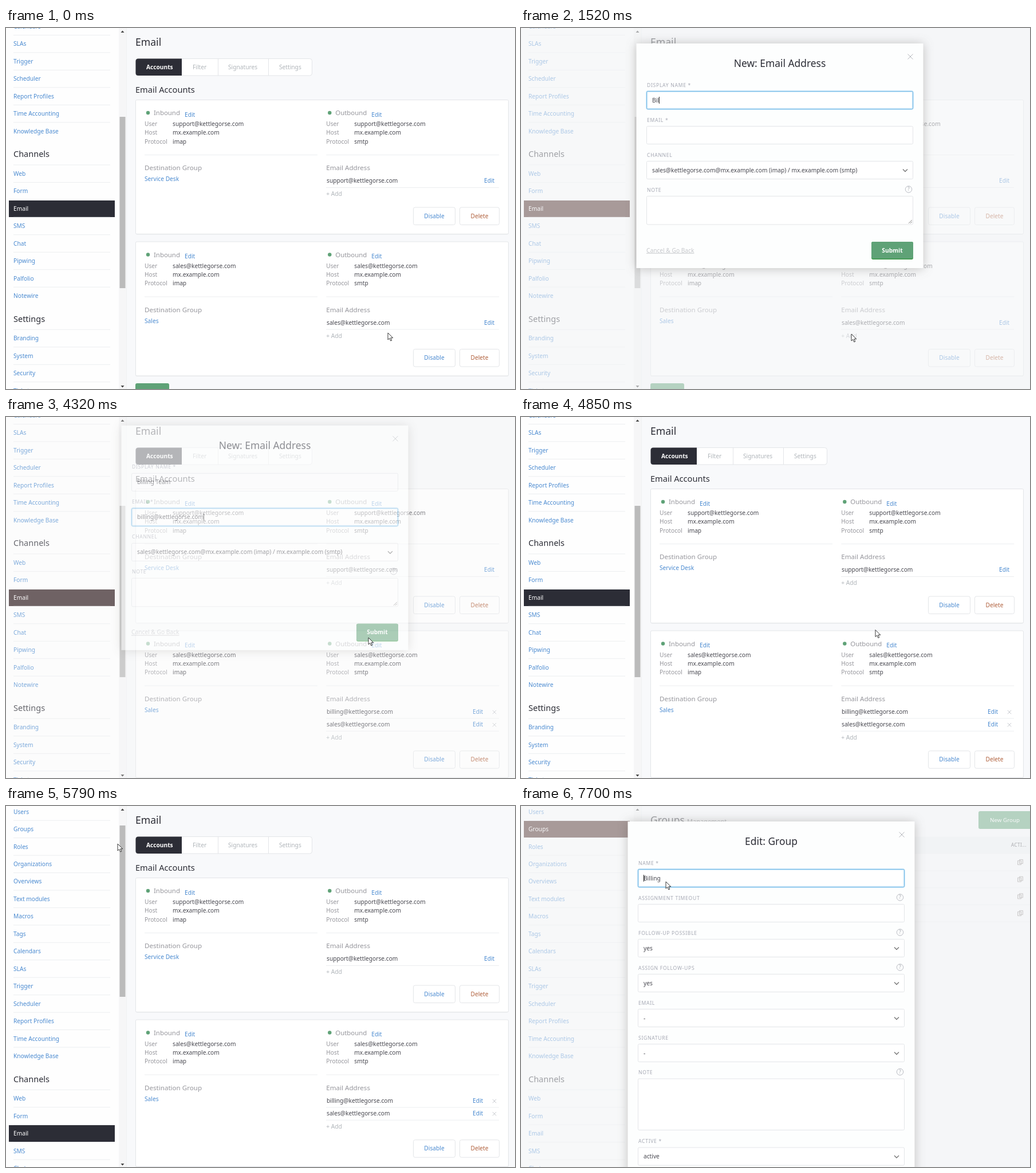
An HTML page for the animation above (8 s loop, 889x630 px).

```html
<!DOCTYPE html>
<html lang="en">
<head>
<meta charset="utf-8">
<title>Email channel setup</title>
<style>
html, body { margin: 0; width: 100%; height: 100%; overflow: hidden; background: #f8f9fb; }
svg { display: block; font-family: "Noto Sans", "Open Sans", sans-serif; }
.modal { filter: drop-shadow(0 1px 9px rgba(70, 65, 60, .3)); }
</style>
</head>
<body>
<svg id="stage" width="889" height="630" viewBox="0 0 889 630"></svg>
<script>
const INK = '#2c2d36', TEXT = '#484850', GRAY = '#96969c', PALE = '#b0b5ba',
      LINK = '#4a8ad0', GREEN = '#5fa277', RULE = '#eceef0', EDGE = '#e3e5e8';
const DOMAIN = 'kettlegorse.com', HOST = 'mx.example.com';
const LOOP = 8000, ROW = 30.45, SCROLL = 256.3, VEIL = .58;

// y is the middle of the capitals
const text = (x, y, s, fill = TEXT, size = 10.2, attrs = '') =>
  `<text x="${x}" y="${y + size * .36}" font-size="${size}" fill="${fill}" ${attrs}>${s}</text>`;
const rect = (x, y, w, h, fill, attrs = '') =>
  `<rect x="${x}" y="${y}" width="${w}" height="${h}" fill="${fill}" ${attrs}/>`;
const box = (x, y, w, h, r = 2) => rect(x, y, w, h, '#fff', `stroke="${EDGE}" rx="${r}"`);
const path = (d, stroke, attrs = '') => `<path d="${d}" fill="none" stroke="${stroke}" ${attrs}/>`;
const rule = (x1, x2, y) => path(`M${x1} ${y}H${x2}`, RULE);
const cross = (x, y, r, color) =>
  path(`M${x - r} ${y - r}l${2 * r} ${2 * r}m0 ${-2 * r}l${-2 * r} ${2 * r}`, color);
const group = (id, body, attrs = '') => `<g id="${id}" ${attrs}>${body}</g>`;
const MEDIUM = 'font-weight="500"', CENTER = 'text-anchor="middle"';

// Sidebar, laid out in its scrolled-up position
const sections = [
  ['', 'Users,Groups,Roles,Organizations,Overviews,Text modules,Macros,Tags,Calendars,SLAs,Trigger,Scheduler,Report Profiles,Time Accounting,Knowledge Base'],
  ['Channels', 'Web,Form,Email,SMS,Chat,Pipwing,Palfolio,Notewire'],
  ['Settings', 'Branding,System,Security,Ticket']
];
const itemY = {};
function sidebar() {
  let y = 10, items = '';
  for (const [title, names] of sections) {
    if (title) {
      items += text(13, y + 9.7, title, INK, 14.5) + rule(13, 182, y + 28.5);
      y += 43.8;
    }
    names.split(',').forEach((name, i, all) => {
      itemY[name] = y;
      items += text(13, y, name, LINK, 10.2, `id="nav${name.replace(' ', '')}"`);
      if (i < all.length - 1) items += rule(13, 182, y + 15.2);
      y += ROW;
    });
  }
  const bar = rect(5, -14.6, 184.5, 29.6, INK) + rect(5, -14.6, 184.5, 29.6, '#401c18', 'id="tint"');
  return rect(0, 0, 197, 630, '#fefefe') +
    group('nav', group('bar', bar, 'shape-rendering="crispEdges"') + items) +
    rect(197, 0, 13.5, 630, '#f6f6f7') + path('M210.5 0V630', '#f0f1f3') +
    '<path d="M200.5 8h6l-3-3.5zM200.5 624h6l-3 3.5z" fill="#444"/>' +
    rect(198.5, 0, 10, 299, '#bbb', 'id="thumb"');
}

function inOut(x, title, user, protocol) {
  const rows = [['User', user], ['Host', HOST], ['Protocol', protocol]];
  return `<circle cx="${x + 6}" cy="148" r="3.2" fill="${GREEN}"/>` +
    text(x + 16, 148, title, GRAY, 11.4) +
    text(x + (title === 'Inbound' ? 70 : 79), 151, 'Edit', LINK) +
    rows.map(([key, value], i) =>
      text(x, 167.5 + 15.2 * i, key, GRAY) + text(x + 49, 167.5 + 15.2 * i, value)).join('') +
    rule(x, x + 302, 221.5);
}

function button(x, y, w, label, color) {
  return box(x, y, w, 30.5, 3) + text(x + w / 2, y + 15, label, color, 10.2, CENTER);
}

function card(dy, user, dest, addresses) {
  const extra = (addresses.length - 1) * 22.2, many = addresses.length > 1;
  const list = addresses.map((a, i) => {
    const y = 266.5 + 22.2 * i;
    return text(560, y, a) + text(many ? 815 : 835, y, 'Edit', LINK) +
      rule(559, 861, y + 12) + (many ? cross(853, y + 1, 3.2, '#c6c9ce') : '');
  }).join('');
  return `<g transform="translate(0 ${dy})">` +
    rect(226.5, 126.5, 651, 234 + extra, '#e9ecee', 'rx="2"') +
    box(226.5, 125.5, 651, 234 + extra) +
    inOut(242, 'Inbound', user, 'imap') + inOut(559.3, 'Outbound', user, 'smtp') +
    text(242, 244, 'Destination Group', GRAY, 11.6) + text(242, 263.5, dest, LINK) +
    text(559.3, 244, 'Email Address', GRAY, 11.6) + list +
    text(559.3, 289.5 + extra, '+ Add', PALE) +
    button(711.5, 313 + extra, 73, 'Disable', LINK) +
    button(792.5, 313 + extra, 69, 'Delete', '#b0603c') + '</g>';
}

function emailPage() {
  const support = 'support@' + DOMAIN, sales = 'sales@' + DOMAIN;
  return text(226, 24.5, 'Email', INK, 17.6) +
    box(226.5, 53.5, 308, 29.5, 4) +
    `<path d="M231 53.5h76v29.5h-76q-4.5 0-4.5-4.5v-20.5q0-4.5 4.5-4.5z" fill="${INK}"/>` +
    path('M370.5 54v29M458.5 54v29', EDGE) +
    text(245, 68.5, 'Accounts', '#fff', 10.2, 'font-weight="600"') +
    text(326, 68.5, 'Filter', PALE) + text(388, 68.5, 'Signatures', PALE) +
    text(477, 68.5, 'Settings', PALE) +
    text(226, 108, 'Email Accounts', INK, 14.6) +
    card(0, support, 'Service Desk', [support]) +
    group('before', card(247.5, sales, 'Sales', [sales]) + rect(226, 620, 59, 30, GREEN, 'rx="3"')) +
    group('after', card(247.5, sales, 'Sales', ['billing@' + DOMAIN, sales]));
}

function groupsPage() {
  const rows = ['2nd Level', 'Billing', 'Sales', 'Service Desk'].map((name, i) => {
    const y = 98 + 29.7 * i;
    return text(233.5, y, name) + rule(226, 889, y + 15) +
      `<g transform="translate(867 ${y - 5})" fill="#eee" stroke="#96908f">
        <path d="M3.5 .5h6v7h-6zM.5 2.5h6v7h-6z"/></g>`;
  }).join('');
  return text(226, 24.5, 'Groups', INK, 17.4) + text(290, 27, 'Management', '#77777d', 11) +
    rect(799, 9, 95, 31, GREEN, 'rx="3"') + text(819, 24.5, 'New Group', '#fff', 9.8, MEDIUM) +
    rect(226, 53.5, 663, 30, '#f0f1f3') +
    text(233, 68.5, 'NAME', TEXT, 8.2, 'letter-spacing=".4"') +
    text(856, 68.5, 'ACTI...', TEXT, 8.2, 'letter-spacing=".4"') + rows;
}

// One labelled form field; kinds: s = select, h = help mark
function field(label, y, { value = '', kind = '', h = 31, id = '' } = {}) {
  return text(1, y - 11, label, '#a6a9b4', 8.6, `letter-spacing=".7" ${MEDIUM}`) +
    box(.5, y, 465, h) +
    text(10, y + 15.5, value, TEXT, 10.2, id && `id="${id}"`) +
    (kind.includes('s') ? path(`M448 ${y + 14}l4 4 4-4`, '#777', 'stroke-width="1.4"') : '') +
    (kind.includes('h') ? `<circle cx="458" cy="${y - 12}" r="5.7" fill="none" stroke="#b8bbc2"/>` +
      text(458, y - 12, '?', '#a0a3aa', 8, CENTER) : '');
}

function modal(id, x, h, title, body) {
  return group(id, `<g class="modal">${rect(-17.5, 27, 501, h, '#fdfefe')}</g>` +
    text(233, 62, title, INK, 17.4, CENTER) + cross(461, 50, 4.5, '#b4b7bc') + body,
    `data-x="${x}"`);
}

const focusRing = id => group(id,
  rect(.5, 110.5, 465, 31, 'none', 'stroke="#a5d8f6" stroke-opacity=".35" stroke-width="4" rx="3"') +
  rect(.5, 110.5, 465, 31, 'none', 'stroke="#62b0e2" rx="2"'));

const addModal = modal('add', 219, 392, 'New: Email Address',
  field('DISPLAY NAME *', 110.5, { id: 'name' }) +
  field('EMAIL *', 171.5, { id: 'mail' }) +
  field('CHANNEL', 232.5, { kind: 's', value: `sales@${DOMAIN}@${HOST} (imap) / ${HOST} (smtp)` }) +
  field('NOTE', 293.5, { kind: 'h', h: 49.5 }) +
  path('M458 341l6-6m-3 6l3-3', '#888') +
  focusRing('ring') + path('M0 120V132', '#222', 'id="caret"') +
  text(0, 388, 'Cancel &amp; Go Back', '#c6c8cc', 10.2, `text-decoration="underline" ${MEDIUM}`) +
  rect(393, 373, 73, 31, '#3c9a48', 'rx="3"') + rect(393, 373, 73, 29.5, GREEN, 'rx="3"') +
  text(429.5, 388, 'Submit', '#fff', 10.2, `${CENTER} font-weight="600"`));

const editModal = modal('edit', 204, 680, 'Edit: Group',
  field('NAME *', 110.5, { value: 'Billing' }) +
  field('ASSIGNMENT TIMEOUT', 171.5, { kind: 'h' }) +
  field('FOLLOW-UP POSSIBLE', 232.5, { kind: 'sh', value: 'yes' }) +
  field('ASSIGN FOLLOW-UPS', 293.5, { kind: 'sh', value: 'yes' }) +
  field('EMAIL', 354.5, { kind: 's', value: '-' }) +
  field('SIGNATURE', 415.5, { kind: 's', value: '-' }) +
  field('NOTE', 476, { kind: 'h', h: 89.5 }) +
  field('ACTIVE *', 596, { kind: 's', value: 'active' }) +
  focusRing('editRing') + path('M10.5 120V132', '#222'));

const $ = id => document.getElementById(id);
$('stage').innerHTML = rect(0, 0, 889, 630, '#f8f9fb') +
  group('emailPage', emailPage()) + group('groupsPage', groupsPage()) + sidebar() +
  rect(0, 0, 889, 630, '#f3f4f6', 'id="veil"') + addModal + editModal +
  group('cursor', '<path d="M0 0V12L2.8 9.5 4.8 14 6.8 13.1 4.8 8.8H8.8Z" fill="#fff" stroke="#222" stroke-width=".9"/>');

// Pointer stops: time, x, y
const stops = [
  [100, 667, 532], [350, 610, 539], [520, 568, 528], [620, 577, 534],
  [3500, 577, 534], [3850, 585, 500], [4050, 633, 385], [4780, 633, 385],
  [4850, 620, 372], [5250, 203, 187], [5350, 203, 187], [5740, 195, 66],
  [5800, 195, 66], [6050, 50, 38], [6330, 50, 38], [6650, 211, 137],
  [7090, 243, 122], [7170, 253, 127], [7280, 253, 127], [7340, 253, 132]
];
const ramp = (t, a, b) => Math.min(1, Math.max(0, (t - a) / (b - a)));
const ease = p => p * (2 - p);

function pointer(t) {
  const i = stops.findIndex(s => s[0] > t);
  if (i < 0) return stops.at(-1).slice(1);
  if (i === 0) return stops[0].slice(1);
  const [t0, x0, y0] = stops[i - 1], [t1, x1, y1] = stops[i], p = ramp(t, t0, t1);
  return [x0 + (x1 - x0) * p, y0 + (y1 - y0) * p];
}

const typed = (t, start, step) => t < start ? 0 : 1 + Math.floor((t - start) / step);
const move = (id, x, y) => $(id).setAttribute('transform', `translate(${x} ${y})`);
const show = (id, on) => $(id).style.display = on ? '' : 'none';

function showModal(id, m) {
  show(id, m > 0);
  $(id).style.opacity = m;
  move(id, $(id).dataset.x, -25 * (1 - m));
}

function draw(t) {
  const onGroups = t >= 6100, saved = t >= 4300;
  show('emailPage', !onGroups);
  show('groupsPage', onGroups);
  show('before', !saved);
  show('after', saved);

  const p = ramp(t, 5350, 5740);
  move('nav', 0, -SCROLL * (1 - p));
  move('thumb', 0, 155 - 121 * p);
  $('thumb').setAttribute('fill', t > 6600 && t < 6720 ? '#a99b9b' : '#bbb');
  const active = onGroups ? 'Groups' : 'Email';
  move('bar', 0, itemY[active]);
  for (const name of ['Email', 'Groups']) {
    const item = $('nav' + name);
    item.setAttribute('fill', name === active ? '#fff' : LINK);
    item.setAttribute('font-weight', name === active ? 500 : 400);
  }

  const add = ease(ramp(t, 890, 1200)) - ease(ramp(t, 4250, 4500));
  const edit = ease(ramp(t, 7320, 7640));
  showModal('add', add);
  showModal('edit', edit);
  $('veil').style.opacity = (add + edit) * VEIL;
  $('tint').style.opacity = add + edit;

  const inMail = t >= 2140;
  $('name').textContent = 'Billing Team'.slice(0, typed(t, 1380, 63));
  const count = t < 3060 ? Math.min(14, typed(t, 2190, 59)) : 14 + typed(t, 3060, 43);
  $('mail').textContent = ('billing@' + DOMAIN).slice(0, count);
  move('ring', 0, inMail ? 61 : 0);
  if (add > 0) move('caret', 10.5 + $(inMail ? 'mail' : 'name').getComputedTextLength(), inMail ? 61 : 0);

  move('cursor', ...pointer(t));
}

function frame() {
  draw(performance.now() % LOOP);
  requestAnimationFrame(frame);
}
frame();
</script>
</body>
</html>
```
